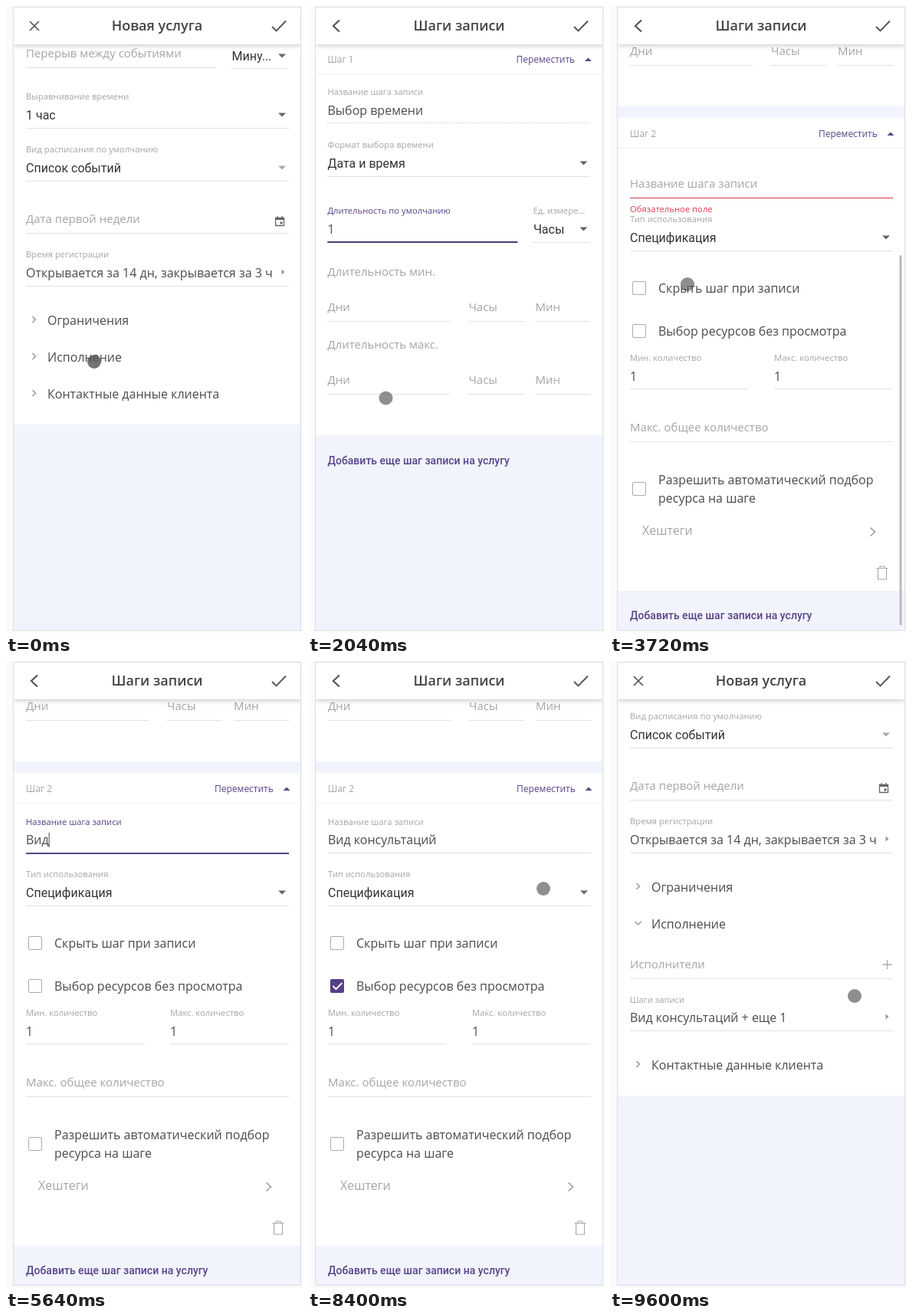
These frames come from a looping animation (386x818 px, 9720 ms). An HTML page:

```html
<!DOCTYPE html>
<html lang="ru">
<head>
<meta charset="utf-8">
<title>Шаги записи</title>
<style>
html, body { margin: 0; width: 100%; height: 100%; overflow: hidden; background: #fbfbfb; }
svg { display: block; width: 386px; height: 818px; }
text { font-family: "Open Sans", "Noto Sans", sans-serif; white-space: pre; }
.rb { font-family: Roboto, Arial, sans-serif; }
</style>
</head>
<body>
<svg id="stage" viewBox="0 0 386 818"></svg>
<script>
const LOOP = 9720, STEP = 120;
const INK = '#4b4b4b', DIM = '#a5a5a5', RULE = '#e1e1e1', VIOLET = '#584488', RED = '#dc3a55', BLUE = '#f1f4fd';
const NAME = 'Вид консультаций';
const stage = document.getElementById('stage');
const pen = document.createElement('canvas').getContext('2d');

// time, x, y, opacity
const POINTER = [
  [0, 115, 464, 1], [600, 118, 464, 1], [840, 122, 455, 1], [960, 135, 369, 1],
  [1200, 112, 291, 1], [1680, 112, 291, 1], [2160, 98, 585, 1], [2400, 96, 599, 1],
  [3240, 96, 599, 1], [3720, 101, 363, 1], [4080, 103, 234, 1], [4680, 103, 234, 1],
  [5040, 103, 234, 0], [7320, 103, 234, 0], [7440, 98, 250, 1], [7680, 38, 424, 1],
  [7920, 38, 424, 1], [8400, 307, 297, 1], [8640, 356, 28, 1], [9240, 356, 28, 1],
  [9480, 361, 129, 1], [9600, 319, 437, 1], [9720, 319, 437, 1]
];
const PRESSES = [0, 720, 1440, 3000, 4440, 7800, 8880];

const clamp = v => Math.max(0, Math.min(1, v));
const ease = (t, a, b) => { const p = clamp((t - a) / (b - a)); return p * p * (3 - 2 * p); };

function pointerAt(t) {
  let i = 1;
  while (i < POINTER.length - 1 && POINTER[i][0] < t) i++;
  const a = POINTER[i - 1], b = POINTER[i], p = clamp((t - a[0]) / (b[0] - a[0]));
  return [1, 2, 3].map(k => a[k] + (b[k] - a[k]) * p);
}

// y is the middle of the capital letters
const text = (x, y, s, size = 16, fill = INK, extra = '') =>
  `<text x="${x}" y="${y + size * .35}" font-size="${size}" fill="${fill}" ${extra}>${s}</text>`;
const roboto = (x, y, s, size = 16, fill = '#333', extra = '') => text(x, y, s, size, fill, 'class="rb" ' + extra);
const label = (x, y, s, fill = DIM) => text(x, y, s, 11.25, fill);
const hint = (x, y, s) => text(x, y, s, 15, DIM);
const box = (x, y, w, h, fill, extra = '') =>
  `<rect x="${x}" y="${y}" width="${w}" height="${h}" fill="${fill}" ${extra}/>`;
const rule = (x1, x2, y, color = RULE, h = 1) => box(x1, y, x2 - x1, h, color);
const path = (d, color, w = 1.5, extra = '') =>
  `<path d="${d}" fill="none" stroke="${color}" stroke-width="${w}" ${extra}/>`;
const solid = (d, fill) => `<path d="${d}" fill="${fill}"/>`;
const down = (x, y, fill = '#666') => solid(`M${x - 5} ${y - 2.5}h10l-5 5z`, fill);
const up = (x, y, fill) => solid(`M${x - 4.5} ${y + 2}h9l-4.5 -4.5z`, fill);
const right = (x, y) => solid(`M${x - 2} ${y - 3.5}v7l4 -3.5z`, '#999');
const move = (x, y, s) => `<g transform="translate(${x} ${y})">${s}</g>`;

const section = (y, s, open = 0) =>
  `<g transform="translate(36.5 ${y - 1}) rotate(${90 * open})">${path('M-2 -4l4 4l-4 4', '#999')}</g>` + text(54, y, s);

const check = (y, on) => on
  ? box(29, y - 9, 18, 18, '#553f88', 'rx="2"') + path(`M32.5 ${y}l4 4l8 -8`, '#fff', 2)
  : box(29.5, y - 8.5, 17, 17, '#fff', 'rx="1.5" stroke="#aaa"');

function header(title, back) {
  const icon = back ? 'M41 18.5l-8 7.5l8 7.5' : 'M31 20l12 12M43 20l-12 12';
  return box(10, 2, 375, 48, '#fff', 'filter="url(#shade)"') + box(10, 2, 375, 48, '#fff')
    + path(icon, '#555', back ? 2.2 : 1.7)
    + text(197, 26, title, 18, '#444', 'font-weight="600" text-anchor="middle"')
    + path('M347 27l5.5 5.5l12.5 -13', '#555', 1.9);
}

function servicePage(open, scroll) {
  const grow = 136 * open;
  const calendar = path('M351.5 276.5h11v10h-11zM354 274v3M360 274v3', '#666', 1.3)
    + box(351, 276, 12, 3, '#666') + box(357.5, 281.5, 3, 3, '#666');
  const staff = hint(26, 511, 'Исполнители') + path('M355.5 511h12M361.5 505v12', '#aaa', 1.3) + rule(26, 369, 529)
    + label(26, 557, 'Шаги записи')
    + text(26, 580, scroll && open && servicePage.saved ? NAME + ' + еще 1' : 'Выбор времени')
    + right(361.5, 579) + rule(26, 369, 597);
  return move(0, -scroll,
    box(10, -80, 375, 626 + grow, '#fff')
    + hint(26, 62, 'Перерыв между событиями') + rule(26, 274, 80)
    + roboto(294.5, 65, 'Мину...') + down(360, 65) + rule(294, 368, 81)
    + label(26, 118, 'Выравнивание времени') + roboto(26, 142, '1 час') + down(360, 142) + rule(26, 369, 159)
    + label(26, 187, 'Вид расписания по умолчанию') + roboto(26, 211, 'Список событий')
    + down(360, 211, '#aaa') + rule(26, 369, 228)
    + hint(26, 278, 'Дата первой недели') + calendar + rule(26, 369, 296)
    + label(26, 324, 'Время регистрации')
    + text(26, 348, 'Открывается за 14 дн, закрывается за 3 ч') + right(361.5, 347) + rule(26, 369, 365)
    + section(410, 'Ограничения') + section(458, 'Исполнение', open)
    + (open ? `<clipPath id="fold">${box(10, 482, 375, grow, '#000')}</clipPath><g clip-path="url(#fold)" opacity="${open}">${staff}</g>` : '')
    + section(506 + grow, 'Контактные данные клиента'));
}

const stepRow = (y, n) => text(26, y, 'Шаг ' + n, 12, DIM) + text(272, y, 'Переместить', 12, VIOLET)
  + up(366, y, VIOLET) + rule(10, 385, y + 18, '#f0f0f0');

const lengthRow = (y, title) => hint(26, y, title)
  + [[26, 186, 'Дни'], [210, 282, 'Часы'], [297, 369, 'Мин']]
    .map(([a, b, s]) => hint(a, y + 46, s) + rule(a, b, y + 64)).join('');

const firstStep = focus => box(10, 2, 375, 558, '#fff') + stepRow(70, 1)
  + label(26, 112, 'Название шага записи') + text(26, 136, 'Выбор времени')
  + path('M26 152.5h342', '#bbb', 1, 'stroke-dasharray="1 2"')
  + label(26, 181, 'Формат выбора времени') + roboto(26, 205, 'Дата и время') + down(360, 205) + rule(26, 369, 222)
  + label(26, 267, 'Длительность по умолчанию', focus ? VIOLET : DIM) + text(26, 291, '1')
  + rule(26, 274, 307, focus ? '#4b3d78' : RULE, focus ? 2 : 1)
  + label(294, 267, 'Ед. измере...') + roboto(294.5, 291, 'Часы') + down(360, 291) + rule(294, 368, 308)
  + lengthRow(347, 'Длительность мин.') + lengthRow(442, 'Длительность макс.');

function nameField(t) {
  const focus = t >= 4440 && t < 7800;
  const typed = NAME.slice(0, Math.max(0, Math.floor((t - 5280) / STEP)));
  const bad = !typed, tone = bad ? RED : focus ? VIOLET : DIM;
  pen.font = '16px "Open Sans", "Noto Sans", sans-serif';
  return (focus || typed ? label(26, 210, 'Название шага записи', tone) : hint(26, 232, 'Название шага записи'))
    + text(26, 233, typed)
    + (focus ? box(26 + pen.measureText(typed).width, 224, 1, 19, '#444') : '')
    + rule(26, 369, 250, bad || focus ? tone : RULE, focus ? 2 : 1)
    + (bad ? label(26, 265, 'Обязательное поле', RED) : '');
}

const secondStep = t => box(10, 146, 375, 617, '#fff') + stepRow(167, 2) + nameField(t)
  + label(26, 278, 'Тип использования') + roboto(26, 302, 'Спецификация') + down(360, 302) + rule(26, 369, 319)
  + check(368) + text(63, 368, 'Скрыть шаг при записи')
  + check(424, t >= 7800) + text(63, 424, 'Выбор ресурсов без просмотра')
  + label(26, 459, 'Мин. количество') + text(26, 483, '1') + rule(26, 181, 499)
  + label(214, 459, 'Макс. количество') + text(214, 483, '1') + rule(214, 369, 499)
  + hint(26, 550, 'Макс. общее количество') + rule(26, 369, 568)
  + check(630) + text(63, 618, 'Разрешить автоматический подбор') + text(63, 642, 'ресурса на шаге')
  + text(42, 684, 'Хештеги', 16, DIM) + path('M339.5 680.5l6 5.5l-6 5.5', '#999')
  + path('M347.5 733.5h15M352 733v-2h6v2M349.5 734v14h11v-14', '#aaa', 1.2);

function stepsPage(t) {
  const two = t >= 3240, scroll = 429 * ease(t, 3180, 3660);
  const spread = (t - 2940) * .73;
  const ripple = !two && spread > 0
    ? `<clipPath id="btn">${box(10, 576, 375, 37, '#000')}</clipPath><circle cx="96" cy="599" r="${spread}" fill="${VIOLET}" opacity=".12" clip-path="url(#btn)"/>`
    : '';
  const bar = two ? ease(t, 3120, 3360) * (1 - ease(t, 3960, 4320)) : 0;
  return move(two ? 0 : -.6, -scroll,
    firstStep(t >= 1440 && t < 3240) + (two ? move(0, 429, secondStep(t)) : '') + ripple
    + roboto(26, two ? 1224 : 593.5, 'Добавить еще шаг записи на услугу', 14, VIOLET, 'font-weight="500"'))
    + box(377.5, 50 + scroll * .641, 3, 483, '#b9b9b9', `rx="1.5" opacity="${bar}"`);
}

const DEFS = `<defs><clipPath id="screen">${box(10, 2, 375, 812.5, '#000')}</clipPath>
<filter id="shade" x="-5%" y="-20%" width="110%" height="160%"><feGaussianBlur stdDeviation="3"/><feColorMatrix values="0 0 0 0 0  0 0 0 0 0  0 0 0 0 0  0 0 0 .2 0"/><feOffset dy="2"/></filter></defs>`;

function scene(t) {
  const steps = t >= 840 && t < 9000;
  servicePage.saved = t >= 9000;
  const late = servicePage.saved;
  const page = steps ? stepsPage(t) : servicePage(late ? 1 : ease(t, 60, 360), late ? 115 : 115 * ease(t, 300, 600));
  const [x, y, alpha] = pointerAt(t);
  const pressed = PRESSES.some(p => t >= p && t <= p + 240);
  return DEFS + box(0, 0, 386, 818, '#fbfbfb')
    + `<g clip-path="url(#screen)">${box(10, 2, 375, 813, BLUE)}${page}${header(steps ? 'Шаги записи' : 'Новая услуга', steps)}</g>`
    + box(9.5, 1.5, 375, 813, 'none', 'stroke="#dddde2"')
    + `<circle cx="${x}" cy="${y}" r="9" fill="#505050" opacity="${alpha * (pressed ? .8 : .64)}"/>`;
}

const start = performance.now();
let shown = -1;
function tick() {
  const t = Math.floor(((performance.now() - start) % LOOP) / STEP) * STEP;
  if (t !== shown) stage.innerHTML = scene(shown = t);
  requestAnimationFrame(tick);
}
tick();
</script>
</body>
</html>
```
